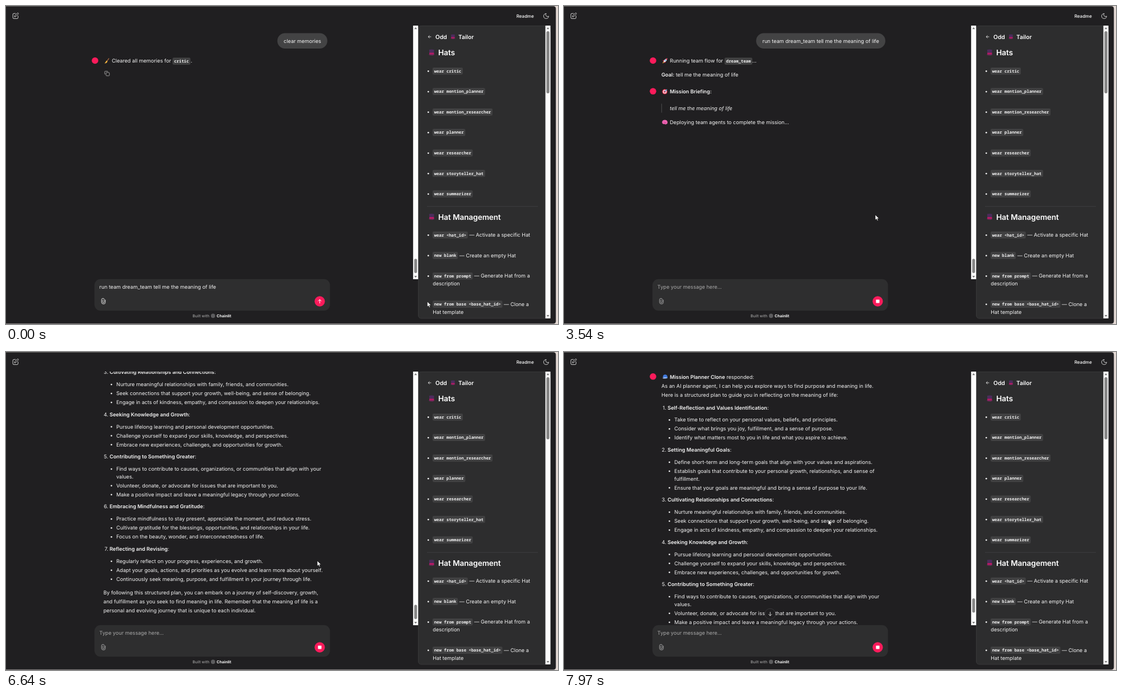
An HTML page that plays this animation: 986x568 px, repeating every 8 s.

```html
<!DOCTYPE html>
<html lang="en">
<head>
<meta charset="utf-8">
<title>Team run chat</title>
<style>
html, body { margin: 0; width: 100%; height: 100%; overflow: hidden; background: #201f21; }
svg { display: block; width: 100vw; height: 100vh; }
text { font-family: Inter, sans-serif; white-space: pre; text-rendering: geometricPrecision; }
.mono { font-family: "Noto Sans Mono", "DejaVu Sans Mono", monospace; font-weight: 700; }
.line { fill: none; stroke-linecap: round; stroke-linejoin: round; }
</style>
</head>
<body>
<svg id="stage" viewBox="0 0 986 568"></svg>
<script>
const BODY = 9.16, STEP = 147.5, LOOP = 8000, END = 422;
const PINK = '#fb1b5b', BG = '#201f21';

const esc = s => s.replace(/</g, '&lt;').replace(/>/g, '&gt;');
const bold = s => `<tspan font-weight="600">${s}</tspan>`;
const rect = (x, y, w, h, fill, r = 0, more = '') =>
  `<rect x="${x}" y="${y}" width="${w}" height="${h}" rx="${r}" fill="${fill}" ${more}/>`;
const circle = (x, y, r, fill, more = '') => `<circle cx="${x}" cy="${y}" r="${r}" fill="${fill}" ${more}/>`;
const line = (d, color, w = 1) => `<path class="line" d="${d}" stroke="${color}" stroke-width="${w}"/>`;
const group = (id, s, more = '') => `<g id="${id}" ${more}>${s}</g>`;
const icon = (id, x, y, scale = 1) => `<use href="#${id}" transform="translate(${x} ${y}) scale(${scale})"/>`;

// y is the middle of the line
const text = (x, y, s, { size = BODY, weight = 400, fill = '#f5f5f5', more = '' } = {}) =>
  `<text x="${x}" y="${y + size * 0.36}" font-size="${size}" font-weight="${weight}" fill="${fill}" ${more}>${s}</text>`;
const chipWidth = s => s.length * 4.42 + 5.4;
const chip = (x, y, s) => rect(x, y - 6.3, chipWidth(s), 12.6, '#414142', 2.2) +
  `<text class="mono" x="${x + 2.7}" y="${y + 2.5}" font-size="7.37" fill="#f2f2f2">${esc(s)}</text>`;
const avatar = y => circle(159, y, 5.8, PINK);
const bubble = (x, s) => rect(x, 48.5, 574 - x, 27.5, '#434344', 13.7) + text(x + 11.3, 62.3, s);

const defs = `<defs>
  <clipPath id="chatClip"><rect y="35" width="727" height="453"/></clipPath>
  <g id="hat">
    <path d="M-4.4-5Q0-5.8 4.4-5L4 3.4H-4Z" fill="#4c2c5c"/>
    <path d="M-4.2.6H4.2L4 3.4H-4Z" fill="#b81a62"/>
    <path d="M-5 3Q0 4.6 5 3Q5 5.2 0 5.2T-5 3Z" fill="#7a2860"/>
  </g>
  <g id="broom">
    <path d="M4-4.5L0 1" stroke="#a5673f" stroke-width="1.3"/>
    <path d="M-.8-.6L1.4 1Q0 4.5-4 4.5Q-2 2.8-.8-.6Z" fill="#f5b640"/>
  </g>
  <g id="rocket">
    <path d="M4.5-4.5Q0-4-2.5 1L-.5 3Q4 0 4.5-4.5Z" fill="#dfe2ec"/>
    <path d="M4.5-4.5Q2.8-4.5 1.6-3.6L3.6-1.6Q4.5-2.8 4.5-4.5M-1-2L-4 0L-2.5 1ZM2 1L0 4L-1 2.5Z" fill="#ee3150"/>
    <circle cx="1.2" cy="-1.2" r="1" fill="#4a90d0"/>
    <path d="M-2.5 1.5L-.9 3L-4.3 4.5Z" fill="#ffab35"/>
  </g>
  <g id="goal">
    <circle r="4.6" fill="#e8314f"/><circle r="3.2" fill="#f4eef0"/><circle r="1.9" fill="#e8314f"/>
    <path d="M0 0L4-4" stroke="#51a8e0" stroke-width="1.3"/>
  </g>
  <g id="brain">
    <path d="M-4.8 0Q-4.8-4 0-4.2Q5-4 5 .5Q5 3 2.5 3.3Q2 4.6.5 3.2Q-4.5 4-4.8 0Z" fill="#f266b4"/>
    <path class="line" d="M-3-.5Q-1-2 0 0T3-.6M-1.5 2Q.5.8 2 2" stroke="#bf3c8c" stroke-width=".7"/>
  </g>
  <g id="dome">
    <path d="M-4 1Q-4-4 .5-4Q4.6-3.5 4.6 2L2 3Z" fill="#3f78dc"/>
    <path d="M-4.8 2.4Q-1-.8 4.6 2Q0 4.4-4.8 2.4Z" fill="#9dc0f5"/>
  </g>
  <path id="arrow" d="M0 0V9.3L2.2 7.3L3.7 10.6L5.2 9.9L3.8 6.7H6.8Z" fill="#fff" stroke="#111" stroke-width=".6"/>
  <path id="hand" d="M-.9.6Q0-.7.9.6V4.2Q2.4 3.6 2.9 4.8Q4 3.9 4.7 5.1Q6 4.4 6.4 6V8.8Q5.8 10.5 5.4 12H.3Q-1.2 9.5-3 7.4Q-3 5.6-.9 7Z" fill="#fff" stroke="#111" stroke-width=".6"/>
</defs>`;

const scrollbar = (x, bottom, thumb) => rect(x, 35, 9, bottom - 35, '#fdfdfd') + thumb +
  `<path d="M${x + 2} 41.3L${x + 4.5} 38L${x + 7} 41.3ZM${x + 2} ${bottom - 6}L${x + 4.5} ${bottom - 2.7}L${x + 7} ${bottom - 6}Z" fill="#777"/>`;

function sidebar() {
  const head = { size: 13.68, weight: 600, fill: '#fff', more: 'letter-spacing="-.1"' };
  const name = { size: 10.26, weight: 600, fill: '#fff' };
  const item = (y, s) => circle(754.3, y + .3, 1.4, '#eee') + chip(762, y, s);
  let s = rect(736.5, 35.5, 236, 522.5, '#2d2d2e', 5, 'stroke="#39393a"') +
    line('M759 55H754.3M756.3 52.8L754.2 55L756.3 57.2', '#ddd', .9) +
    text(767, 55, 'Odd', name) + icon('hat', 798.3, 55, .78) + text(808, 55, 'Tailor', name) +
    icon('hat', 760.3, 83) + text(772, 83.3, 'Hats', head) +
    rect(752, 357.6, 198, .8, '#434344') +
    icon('hat', 760.3, 376.5) + text(772, 376.8, 'Hat Management', head);
  ['critic', 'mention_planner', 'mention_researcher', 'planner', 'researcher', 'storyteller_hat', 'summarizer']
    .forEach((hat, i) => s += item(116.2 + 36.57 * i, 'wear ' + hat));
  [[409, 'wear <hat_id>', 'Activate a specific Hat'],
   [445.6, 'new blank', 'Create an empty Hat'],
   [482.2, 'new from prompt', 'Generate Hat from a', 'description'],
   [532.6, 'new from base <base_hat_id>', 'Clone a', 'Hat template']]
    .forEach(([y, cmd, what, rest]) => {
      s += item(y, cmd) + text(764.6 + chipWidth(cmd), y, '— ' + what) + (rest ? text(762.3, y + 13.7, rest) : '');
    });
  return s + scrollbar(963.5, 558, rect(965.3, 45, 5.4, 111, '#858585', 2.7));
}

// "|" marks a wrapped line
const plan = [
  ['Self-Reflection and Values Identification',
   'Take time to reflect on your personal values, beliefs, and principles.',
   'Consider what brings you joy, fulfillment, and a sense of purpose.',
   'Identify what matters most to you in life and what you aspire to achieve.'],
  ['Setting Meaningful Goals',
   'Define short-term and long-term goals that align with your values and aspirations.',
   'Establish goals that contribute to your personal growth, relationships, and sense of|fulfillment.',
   'Ensure that your goals are meaningful and bring a sense of purpose to your life.'],
  ['Cultivating Relationships and Connections',
   'Nurture meaningful relationships with family, friends, and communities.',
   'Seek connections that support your growth, well-being, and sense of belonging.',
   'Engage in acts of kindness, empathy, and compassion to deepen your relationships.'],
  ['Seeking Knowledge and Growth',
   'Pursue lifelong learning and personal development opportunities.',
   'Challenge yourself to expand your skills, knowledge, and perspectives.',
   'Embrace new experiences, challenges, and opportunities for growth.'],
  ['Contributing to Something Greater',
   'Find ways to contribute to causes, organizations, or communities that align with your|values.',
   'Volunteer, donate, or advocate for issues that are important to you.',
   'Make a positive impact and leave a meaningful legacy through your actions.'],
  ['Embracing Mindfulness and Gratitude',
   'Practice mindfulness to stay present, appreciate the moment, and reduce stress.',
   'Cultivate gratitude for the blessings, opportunities, and relationships in your life.',
   'Focus on the beauty, wonder, and interconnectedness of life.'],
  ['Reflecting and Revising',
   'Regularly reflect on your progress, experiences, and growth.',
   'Adapt your goals, actions, and priorities as you evolve and learn more about yourself.',
   'Continuously seek meaning, purpose, and fulfillment in your journey through life.']
];

function response() {
  let y = 238.3;
  let s = avatar(y - .5) + icon('dome', 180.5, y) + text(189, y, bold('Mission Planner Clone') + ' responded:') +
    text(174, y + 16, 'As an AI planner agent, I can help you explore ways to find purpose and meaning in life.') +
    text(174, y + 32, 'Here is a structured plan to guide you in reflecting on the meaning of life:');
  y += 55;
  plan.forEach(([title, ...points], i) => {
    s += text(182.7, y, i + 1 + '.', { more: 'text-anchor="end"' }) + text(185, y, bold(title) + ':');
    y += 21.8;
    for (const point of points) {
      const [first, rest] = point.split('|');
      s += circle(188.3, y + .3, 1.4, '#eee') + text(197, y, first);
      if (rest) s += text(197, y += 13.7, rest);
      y += 16;
    }
    y += 5.7;
  });
  y += 2.4;
  ['By following this structured plan, you can embark on a journey of self-discovery, growth,',
   'and fulfillment as you seek to find meaning in life. Remember that the meaning of life is a',
   'personal and evolving journey that is unique to each individual.']
    .forEach((row, i) => s += text(174, y + 16 * i, row));
  return s;
}

const prompt = 'run team dream_team tell me the meaning of life';

const chat = group('chat',
  group('before', bubble(484.7, 'clear memories') + avatar(97.5) + icon('broom', 180, 98) +
    text(189, 98, 'Cleared all memories for') + chip(297.5, 98.5, 'critic') + text(330, 98, '.') +
    rect(178.7, 118.7, 6, 6, 'none', 1.2, 'stroke="#aaa" stroke-width=".9"') +
    line('M176.8 122.2Q176.3 122 176.3 121V117.4Q176.3 116.5 177.2 116.5H181Q181.9 116.5 182 117', '#aaa', .9)) +
  group('scroll',
    group('sent', bubble(343.2, prompt)) +
    group('running', avatar(97.5) + icon('rocket', 180, 98) + text(189, 98, 'Running team flow for') +
      chip(286.8, 98.5, 'dream_team') + text(336, 98, '...') +
      text(174, 123, bold('Goal:') + ' tell me the meaning of life')) +
    group('mission', avatar(152.3) + icon('goal', 180, 153) + text(189, 153, bold('Mission Briefing:')) +
      rect(173.8, 174.5, 1.2, 16, '#454546') +
      text(189, 182.4, 'tell me the meaning of life', { more: 'font-style="italic"' }) +
      icon('brain', 180, 207.7) + text(189, 207.7, 'Deploying team agents to complete the mission...')) +
    group('reply', response())),
  'clip-path="url(#chatClip)"');

const clip = color => line('M177.5 525V529.5Q177.4 532.3 174.2 532.3Q170.6 532.2 170.6 529V524.7Q170.8 522.2 173.2 522.2Q175.6 522.3 175.6 524.7V529Q175.5 530.3 174.2 530.3Q172.8 530.2 172.8 529V525', color, .95);

const composer = rect(158, 487.8, 420.7, 56.4, '#2e2e2f', 11) + circle(560.4, 527.5, 9.2, PINK) +
  group('draft', text(166.8, 501.5, prompt) + clip('#e4e4e4') +
    line('M560.4 530.8V524.4M557.7 527L560.4 524.3L563.1 527', '#fff', 1)) +
  group('empty', text(166.8, 501.5, 'Type your message here...', { fill: '#a8a8a8' }) + clip('#a8a8a8') +
    rect(557.3, 524.4, 6.2, 6.2, '#fff', .8)) +
  text(333.3, 553.4, 'Built with', { size: 6.95, fill: '#b4b4b4' }) + circle(369.8, 553.4, 3.8, '#5c5c5e') +
  text(376.3, 553.4, 'Chainlit', { size: 6.95, weight: 700 });

const topbar =
  line('M17 13.3H14Q12.3 13.3 12.3 15V20.8Q12.3 22.5 14 22.5H19.8Q21.5 22.5 21.5 20.8V17.7M15.3 19.3L15.8 17L20.4 12.6Q21.5 12 22 12.8Q22.6 13.5 22 14.2L17.5 18.8Z', '#d6d6d6', .95) +
  text(911.8, 17.7, 'Readme', { size: 7.98, weight: 500, fill: '#fff' }) +
  line('M964.6 13.4A4.5 4.5 0 1 0 969.3 18.2A3.4 3.4 0 0 1 964.6 13.4Z', '#d6d6d6', .95);

const stage = document.getElementById('stage');
stage.innerHTML = defs +
  rect(0, 0, 986, 568, '#e3d9d4') + rect(-6, .6, 988, 566.6, BG, 4, 'stroke="#48474a" stroke-width=".6"') +
  topbar + chat +
  group('down', circle(368.3, 467.8, 9.5, BG, 'stroke="#414143" stroke-width=".8"') +
    line('M368.3 464.7V471M365.7 468.5L368.3 471.1L370.9 468.5', '#ddd', .95)) +
  composer + sidebar() +
  scrollbar(727.2, 488, rect(729.2, 451.5, 5, 25.5, '#858585', 2.5, 'id="thumb"')) +
  '<use id="cursor"/>';

const parts = Object.fromEntries([...stage.querySelectorAll('[id]')].map(el => [el.id, el]));
const show = (id, on) => parts[id].style.display = on ? '' : 'none';
const move = (id, x, y) => parts[id].setAttribute('transform', `translate(${x} ${y})`);

// [step, x, y]
const path = [[0, 752.5, 528], [1, 700, 532], [2, 615, 531], [3, 561, 528], [7, 559, 450], [8, 556, 373], [54, 472, 299.5]];

function scrollAt(k) {
  if (k < 42) return 0;
  if (k > 53) return END - 228;
  if (k > 52) return END - 51;
  const left = Math.max(0, 1 - (k - 42) * STEP / 400);
  return END * (1 - left ** 3);
}

function draw(now) {
  const k = Math.floor(now % LOOP / STEP), scroll = scrollAt(k);
  const [, x, y] = path.findLast(p => p[0] <= k);
  show('before', k < 4);
  show('draft', k < 4);
  show('sent', k >= 4);
  show('empty', k >= 4);
  show('running', k >= 5);
  show('mission', k >= 6);
  show('reply', k >= 42);
  show('down', k >= 53);
  move('scroll', 0, -scroll);
  move('thumb', 0, k < 42 ? 0 : (scroll - END) * .05);
  parts.cursor.setAttribute('href', k >= 3 && k < 7 ? '#hand' : '#arrow');
  move('cursor', x, y);
}

const start = performance.now();
(function tick() {
  draw(performance.now() - start);
  requestAnimationFrame(tick);
})();
</script>
</body>
</html>
```
